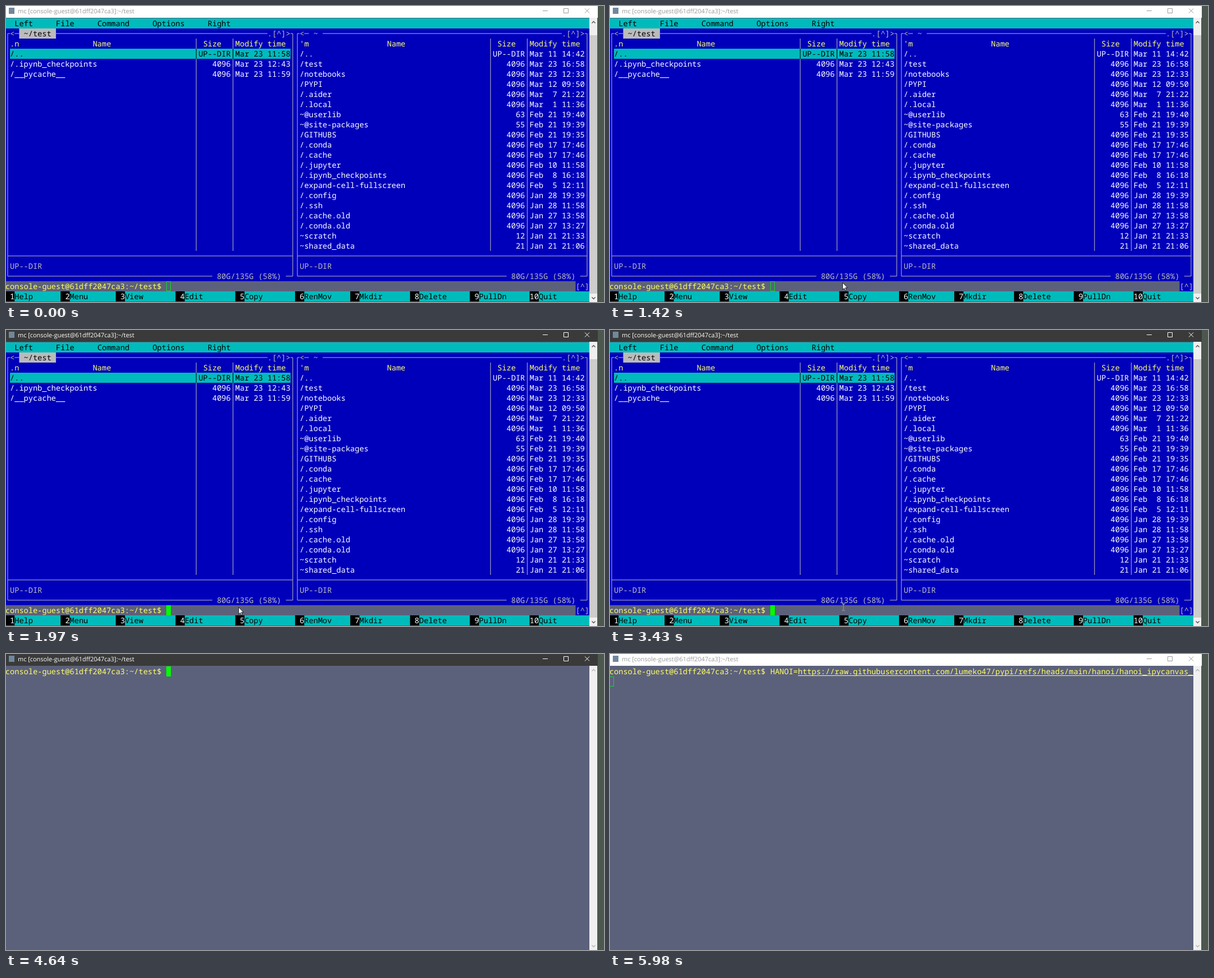
These frames come from a looping animation (1063 by 527 pixels, 8000 ms). An HTML page:

```html
<!DOCTYPE html>
<html lang="en">
<head>
<meta charset="utf-8">
<title>Terminal session</title>
<style>
  html, body { margin: 0; width: 100%; height: 100%; overflow: hidden; background: #4c574e; }
  svg { display: block; }
  text { white-space: pre; text-rendering: geometricPrecision; }
  .term { font: 13.623px "Noto Sans Mono", "DejaVu Sans Mono", monospace; }
  .title { font: 10.93px "Open Sans", "Noto Sans", sans-serif; }
  .beam { mix-blend-mode: difference; }
</style>
</head>
<body>
<script>
const DURATION = 8000;
const CELL = 8.174, ROW = 18, LEFT = -1.1, TOP = 22, EDGE = 1037, RIGHT = 1051;
const SLATE = '#5c617b', BLUE = '#0000bb', CYAN = '#00bbbb', GRAY = '#bbbbbb';
const YELLOW = '#ffff66', WHITE = '#ffffff', BLACK = '#000000', GREEN = '#00ff00';
const PROMPT = 'console-guest@61dff2047ca3:~/test$';

const colX = col => LEFT + col * CELL;
const rowY = row => TOP + row * ROW;

function add(parent, tag, attrs = {}, content = '') {
  const node = document.createElementNS('http://www.w3.org/2000/svg', tag);
  for (const key in attrs) node.setAttribute(key, attrs[key]);
  node.textContent = content;
  parent.append(node);
  return node;
}
const box = (parent, x, y, width, height, fill) =>
  add(parent, 'rect', { x, y, width, height, fill });
const print = (parent, col, row, content, fill) =>
  add(parent, 'text', { class: 'term', x: colX(col), y: rowY(row) + 13.8, fill }, content);
const cells = (parent, col, row, count, fill) =>
  box(parent, colX(col), rowY(row), count * CELL, ROW, fill);
// Rules run through the middle of their cells.
const hLine = (parent, x1, x2, row) =>
  box(parent, x1, rowY(row + .5) - .5, x2 - x1, 1, GRAY);
const vLine = (parent, col, row1, row2, fill = GRAY) =>
  box(parent, colX(col + .5) - .5, rowY(row1), 1, (row2 - row1) * ROW, fill);

// Each step is [time in ms, style]; styles hold until the next step.
function play(node, steps) {
  const last = [DURATION, steps[steps.length - 1][1]];
  node.animate(
    [...steps, last].map(([time, style]) => ({ ...style, offset: time / DURATION, easing: 'step-end' })),
    { duration: DURATION, iterations: Infinity });
}
const hidden = { opacity: 0 }, shown = { opacity: 1 };
const at = (x, y) => ({ opacity: 1, transform: `translate(${x}px, ${y}px)` });

const svg = add(document.body, 'svg', { width: 1063, height: 527, viewBox: '0 0 1063 527' });
box(svg, 0, 21, EDGE, 506, SLATE);

// File manager
const manager = add(svg, 'g');

function panel(first, last, title, sort, files, current) {
  const size = last - 21, time = last - 13;
  const x1 = colX(first + .5), x2 = colX(last + .5);
  const titleEnd = first + 3 + title.length;

  vLine(manager, first, 1.5, 25.5);
  vLine(manager, last, 1.5, 25.5);
  hLine(manager, x1, colX(first + 1), 1);
  hLine(manager, colX(first + 2), colX(first + 3), 1);
  hLine(manager, colX(titleEnd), colX(last - 5), 1);
  hLine(manager, colX(last), x2, 1);
  hLine(manager, x1, x2, 23);
  hLine(manager, x1, colX(last - 17), 25);
  hLine(manager, colX(last - 1), x2, 25);

  print(manager, first + 1, 1, '<', GRAY);
  if (current) cells(manager, first + 3, 1, title.length, GRAY);
  print(manager, first + 3, 1, title, current ? BLACK : GRAY);
  print(manager, last - 5, 1, '.[^]>', GRAY);
  print(manager, first + 1, 2, sort, YELLOW);
  print(manager, first + (current ? 19 : 20), 2, 'Name', YELLOW);
  print(manager, size + 2, 2, 'Size', YELLOW);
  print(manager, time + 1, 2, 'Modify time', YELLOW);

  for (const col of [size, time]) vLine(manager, col, 2, 23);
  if (current) {
    cells(manager, first + 1, 3, last - first - 1, CYAN);
    for (const col of [size, time]) vLine(manager, col, 3, 4, BLACK);
  }

  files.trim().split('\n').forEach((line, i) => {
    const [name, bytes, date] = line.trim().split('|');
    const fill = current && i === 0 ? BLACK : WHITE;
    print(manager, first + 1, 3 + i, name, fill);
    print(manager, time - bytes.length, 3 + i, bytes, fill);
    print(manager, time + 1, 3 + i, date, fill);
  });
  print(manager, first + 1, 24, 'UP--DIR', GRAY);
  print(manager, last - 16, 25, '80G/135G (58%)', GRAY);
}

box(manager, 0, rowY(0), EDGE, ROW, CYAN);
box(manager, 0, rowY(1), EDGE, 25 * ROW, BLUE);
[[2, 'Left'], [11, 'File'], [20, 'Command'], [32, 'Options'], [44, 'Right']]
  .forEach(([col, label]) => print(manager, col, 0, label, BLACK));

panel(0, 62, ' ~/test ', '.n', `
  /..|UP--DIR|Mar 23 11:58
  /.ipynb_checkpoints|4096|Mar 23 12:43
  /__pycache__|4096|Mar 23 11:59`, true);

panel(63, 126, ' ~ ', "'m", `
  /..|UP--DIR|Mar 11 14:42
  /test|4096|Mar 23 16:58
  /notebooks|4096|Mar 23 12:33
  /PYPI|4096|Mar 12 09:50
  /.aider|4096|Mar  7 21:22
  /.local|4096|Mar  1 11:36
  ~@userlib|63|Feb 21 19:40
  ~@site-packages|55|Feb 21 19:39
  /GITHUBS|4096|Feb 21 19:35
  /.conda|4096|Feb 17 17:46
  /.cache|4096|Feb 17 17:46
  /.jupyter|4096|Feb 10 11:58
  /.ipynb_checkpoints|4096|Feb  8 16:18
  /expand-cell-fullscreen|4096|Feb  5 12:11
  /.config|4096|Jan 28 19:39
  /.ssh|4096|Jan 28 11:58
  /.cache.old|4096|Jan 27 13:58
  /.conda.old|4096|Jan 27 13:27
  ~scratch|12|Jan 21 21:33
  ~shared_data|21|Jan 21 21:06`, false);

print(manager, 0, 26, PROMPT, YELLOW);
cells(manager, 124, 26, 3, BLUE);
print(manager, 124, 26, '[^]', GRAY);

box(manager, 0, rowY(27), EDGE, ROW, CYAN);
const keyCols = [0, 12, 24, 37, 50, 63, 75, 88, 101, 114];
'Help Menu View Edit Copy RenMov Mkdir Delete PullDn Quit'.split(' ').forEach((label, i) => {
  const col = keyCols[i];
  cells(manager, col, 27, 2, BLACK);
  print(manager, col, 27, String(i + 1).padStart(2), WHITE);
  print(manager, col + 2, 27, label, BLACK);
});
play(manager, [[0, shown], [3490, hidden]]);

// Shell
const shell = add(svg, 'g');
print(shell, 0, 0, PROMPT, YELLOW);
play(shell, [[0, hidden], [3490, shown]]);

const command = add(svg, 'g');
print(command, 35, 0, 'HANOI=https://raw.githubusercontent.com/lumeko47/pypi/refs/heads/main/hanoi/hanoi_ipycanvas_', YELLOW);
box(command, colX(41), 38, EDGE - colX(41), 1, YELLOW);
play(command, [[0, hidden], [5980, shown]]);

const caret = add(svg, 'rect', { x: .5, y: .5, width: 7, height: 17 });
const caretAt = (col, row, solid) => ({
  ...at(Math.round(colX(col)), rowY(row)),
  fill: solid ? GREEN : 'transparent',
  stroke: solid ? GREEN : '#10d828'
});
play(caret, [
  [0, caretAt(35, 26, false)], [1610, caretAt(35, 26, true)], [3490, caretAt(35, 0, true)],
  [5820, caretAt(35, 0, false)], [5980, caretAt(0, 1, false)]
]);

// Scroll bar
box(svg, EDGE, 21, RIGHT - EDGE, 506, '#f0f0f0');
const thumb = box(svg, EDGE, 52, RIGHT - EDGE, 460, '#cdcdcd');
play(thumb, [[0, shown], [3490, hidden]]);
const chevrons = add(svg, 'path', {
  d: 'M1041.5 30.5l3-3 3 3M1041.5 518.5l3 3 3-3', fill: 'none', 'stroke-width': 1.4
});
play(chevrons, [[0, { stroke: '#505050' }], [3490, { stroke: '#b4b4b4' }]]);

// Title bar
const bar = box(svg, 0, 0, 1052, 21, WHITE);
const inactive = '#999999', dark = '#3a3a3a';
play(bar, [[0, { fill: WHITE }], [1610, { fill: dark }], [5820, { fill: WHITE }]]);
box(svg, 5, 3, 10, 11, '#71879c');
const heading = add(svg, 'g');
add(heading, 'text', { class: 'title', x: 21, y: 13, fill: 'currentColor' },
  'mc [' + PROMPT.replace(':~/test$', ']:~/test'));
add(heading, 'path', {
  d: 'M954 8.5h9M991.5 4.5h8v8h-8zM1029 4.5l8 8M1037 4.5l-8 8', fill: 'none', stroke: 'currentColor'
});
play(heading, [[0, { color: inactive }], [1610, { color: WHITE }], [5820, { color: inactive }]]);

// Mouse
const click = add(svg, 'circle', { cx: 412, cy: 493, r: 10, fill: '#ffff00', 'fill-opacity': .47 });
play(click, [[0, hidden], [1610, shown], [1820, hidden]]);

const arrow = add(svg, 'path', {
  d: 'M.5 .5V13L3.4 10.4 5.5 15 7.3 14.2 5.3 9.7H9.2Z', fill: WHITE, stroke: BLACK, 'stroke-width': .8
});
play(arrow, [
  [0, hidden], [530, at(721, 501)], [600, at(630, 478)], [670, at(540, 461)], [740, at(471, 455)],
  [810, at(433, 462)], [1070, at(421, 477)], [1140, at(413, 486)], [1350, at(412, 489)],
  [1420, at(413, 492)], [1970, at(413, 493)], [3430, hidden]
]);

const beam = add(svg, 'path', {
  class: 'beam', d: 'M-3-6H-1L0-5.5 1-6H3M0-5.5V5.5M-3 6H-1L0 5.5 1 6H3', fill: 'none', stroke: WHITE
});
play(beam, [
  [0, hidden], [3430, at(415, 493.5)], [4180, at(431, 484)], [4240, at(454, 476.5)],
  [4440, at(482, 472.5)], [4507, at(530, 485)], [4573, at(578, 516)], [4640, hidden]
]);
</script>
</body>
</html>
```
